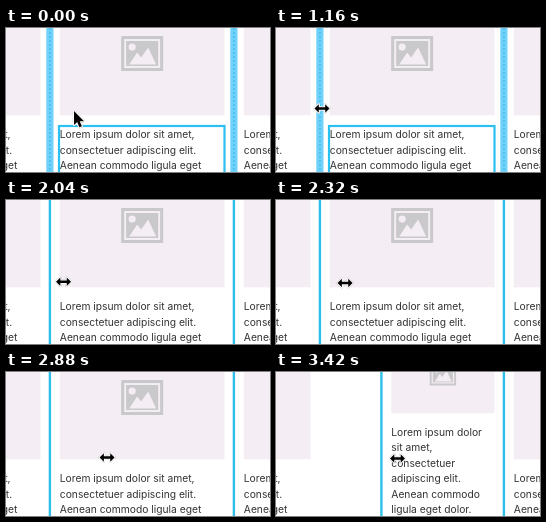
An HTML page for the animation above (4180 ms loop, 264x144 px).

```html
<!DOCTYPE html>
<html lang="en">
<head>
<meta charset="utf-8">
<title>Column resize</title>
<style>
  html, body { margin: 0; width: 100%; height: 100%; overflow: hidden; background: #fff; }
  #stage { position: relative; width: 264px; height: 144px; overflow: hidden; }
  p { position: absolute; margin: 0; color: #333; font: 10.28px/15.5px Inter, "Open Sans", sans-serif; }
  svg { position: absolute; inset: 0; display: block; }
  #cursor { filter: drop-shadow(0 0.6px 0.7px rgba(0, 0, 0, 0.45)); }
</style>
</head>
<body>
<div id="stage">
  <svg id="pictures" width="264" height="144">
    <defs>
      <g id="icon" fill="#c9c8ca">
        <path fill-rule="evenodd" d="M-21-17.5H21V17.5H-21Z M-18-14.5V14.5H18V-14.5Z"/>
        <path d="M-16-12.5H16V12.5H-16Z"/>
        <g fill="#f4edf3">
          <circle cx="-10" cy="-6.5" r="3.6"/>
          <path d="M-13 11L-5-1L-1 4L6-6L14 11Z"/>
        </g>
      </g>
    </defs>
  </svg>
  <svg id="overlay" width="264" height="144">
    <g id="lines" fill="#2fc0ea"></g>
    <g id="bars"></g>
    <g fill="none" stroke="#2bc0f0" stroke-width="2.2">
      <rect id="textBox" x="53" y="98" width="165.5" height="60"/>
      <rect id="imageBox" x="53" y="-37" width="165.5" height="125"/>
    </g>
    <g id="cursor" stroke="#fff" stroke-width="2.2" stroke-linejoin="round" paint-order="stroke">
      <path id="arrow" d="M0 0V14L3.2 11L5.4 16.2L7.9 15.2L5.7 10.2H10Z"/>
      <path id="resize" d="M-7.5 0L-3.2-4.3V-1.2H3.2V-4.3L7.5 0L3.2 4.3V1.2H-3.2V4.3Z"/>
    </g>
  </svg>
</div>
<script>
const LOOP = 4180, PITCH = 184, LEFT = 53.8, WIDTH = 164.7, LINE = 43.9, SHIFT = 61.5;
const COPY = "Lorem ipsum dolor sit amet, consectetuer adipiscing elit. Aenean commodo ligula eget dolor. Aenean massa.";
const $ = id => document.getElementById(id);

function add(parent, tag, attrs) {
  const node = document.createElementNS("http://www.w3.org/2000/svg", tag);
  set(node, attrs);
  return parent.appendChild(node);
}
function set(node, attrs) {
  for (const key in attrs) node.setAttribute(key, attrs[key]);
}
const clamp = x => Math.min(1, Math.max(0, x));
const smooth = x => x * x * (3 - 2 * x);

// Linear interpolation through [time, value] points
function track(t, points) {
  let [t0, v0] = points[0];
  for (const [t1, v1] of points) {
    if (t < t1) return v0 + (v1 - v0) * clamp((t - t0) / (t1 - t0));
    [t0, v0] = [t1, v1];
  }
  return v0;
}

function makeColumn() {
  const text = document.createElement("p");
  text.textContent = COPY;
  $("stage").insertBefore(text, $("overlay"));
  return {
    text,
    image: add($("pictures"), "rect", { fill: "#f4edf3" }),
    icon: add($("pictures"), "use", { href: "#icon" })
  };
}
function layoutColumn({ text, image, icon }, x, width) {
  const top = -36.2, height = width * 0.75;
  set(image, { x, y: top, width, height });
  set(icon, { transform: `translate(${x + width / 2} ${top + height / 2}) scale(${width / WIDTH})` });
  text.style.left = x + "px";
  text.style.top = top + height + 11.7 + "px";
  text.style.width = width + "px";
}

const columns = [-1, 0, 1].map(i => {
  const column = makeColumn();
  layoutColumn(column, LEFT + i * PITCH, WIDTH);
  return column;
});
const lines = [0, 1].map(i => {
  const x = LINE + i * PITCH;
  add($("bars"), "rect", { x: x - 3.6, y: 0, width: 7.2, height: 144, fill: "#70d2fa" });
  add($("bars"), "path", { d: `M${x} 0V144`, stroke: "#4fc2f0", "stroke-width": 2, "stroke-dasharray": "2 2" });
  return add($("lines"), "rect", { x: x - 1.2, y: 0, width: 2.4, height: 144 });
});

const cursorX = [[0, 68], [20, 68], [300, 50], [380, 46.7], [840, 46.5], [1160, 46], [1880, 46],
  [2040, 57.5], [2320, 69], [2420, 73], [2880, 101], [2960, 105.5], [3420, 121.5]];
const cursorY = [[0, 83], [20, 83], [300, 78], [380, 80.5], [1880, 80.5],
  [2040, 81.7], [2320, 83], [2880, 85.5], [3420, 86.5]];

function draw(t) {
  const shift = SHIFT * smooth(clamp((t - 2960) / 460));
  layoutColumn(columns[1], LEFT + shift, WIDTH - shift);
  set(lines[0], { x: LINE - 1.2 + shift });

  const highlight = track(t, [[0, 1], [1360, 1], [1440, 0]]);
  set($("bars"), { opacity: highlight });
  set($("textBox"), { opacity: highlight });
  set($("imageBox"), { opacity: track(t, [[0, 0], [40, 0], [200, 0.55], [300, 0.55], [460, 0]]) });

  const resizing = t >= 380;
  const transform = `translate(${track(t, cursorX)} ${track(t, cursorY)})`;
  set($("arrow"), { transform, visibility: resizing ? "hidden" : "visible" });
  set($("resize"), { transform, visibility: resizing ? "visible" : "hidden" });
}

const start = performance.now();
function tick() {
  draw((performance.now() - start) % LOOP);
  requestAnimationFrame(tick);
}
tick();
</script>
</body>
</html>
```
